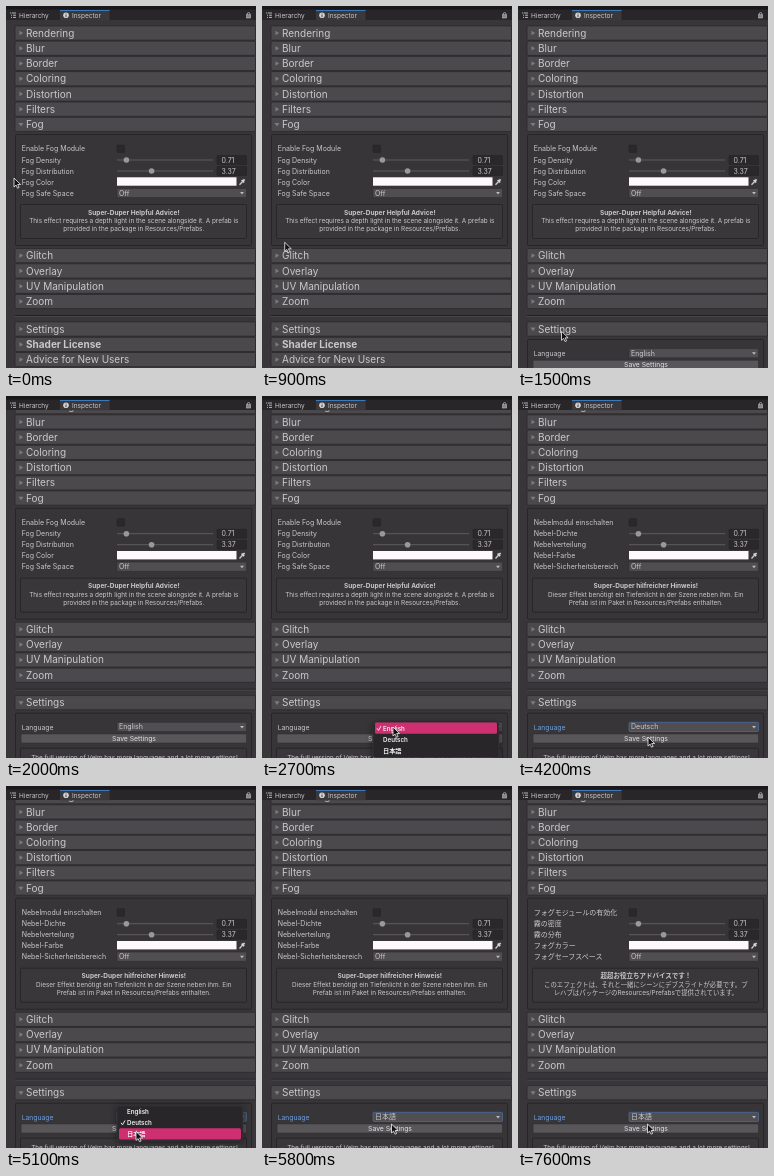
An HTML page that plays this animation: 250 px wide and 362 px high, repeating every 7.7 s.

```html
<!DOCTYPE html>
<html lang="en">
<head>
<meta charset="utf-8">
<title>Inspector language switch</title>
<style>
html, body { margin: 0; width: 100%; height: 100%; overflow: hidden; background: #383639; }
svg { display: block; width: 100vw; height: 100vh; }
text { font-family: Inter, "Noto Sans CJK JP", "Noto Sans CJK", sans-serif; fill: #cac8cb; white-space: pre; }
#menu { filter: drop-shadow(0 1px 3px rgba(0, 0, 0, .55)); }
#menu text { fill: #f2f0f2; font-weight: 600; }
</style>
</head>
<body>
<svg id="stage" viewBox="0 0 250 362"></svg>
<script>
const LOOP = 7700;
const SCROLL = -16.3;
const LANGS = ['English', 'Deutsch', '日本語'];
const FOG = [
  {
    labels: ['Enable Fog Module', 'Fog Density', 'Fog Distribution', 'Fog Color', 'Fog Safe Space'],
    tip: ['Super-Duper Helpful Advice!',
      'This effect requires a depth light in the scene alongside it. A prefab is',
      'provided in the package in Resources/Prefabs.']
  },
  {
    labels: ['Nebelmodul einschalten', 'Nebel-Dichte', 'Nebelverteilung', 'Nebel-Farbe', 'Nebel-Sicherheitsbereich'],
    tip: ['Super-Duper hilfreicher Hinweis!',
      'Dieser Effekt benötigt ein Tiefenlicht in der Szene neben ihm. Ein',
      'Prefab ist im Paket in Resources/Prefabs enthalten.']
  },
  {
    labels: ['フォグモジュールの有効化', '霧の密度', '霧の分布', 'フォグカラー', 'フォグセーフスペース'],
    tip: ['超超お役立ちアドバイスです！',
      'このエフェクトは、それと一緒にシーンにデプスライトが必要です。プ',
      'レハブはパッケージのResources/Prefabsで提供されています。']
  }
];

// Pointer stops: time, x, y. It is out of sight between 2000 and 2200.
const PATH = [
  [0, 8, 172], [700, 8, 172], [1150, 43, 325], [1400, 43, 325], [1500, 43.5, 325.3],
  [2000, 43.5, 325.3], [2200, 160, 354], [2500, 131, 331], [2800, 131, 331],
  [3200, 131.5, 345], [3600, 131.5, 345], [3900, 130, 341], [4400, 130, 341],
  [4600, 130, 332], [4800, 130, 336], [5150, 130, 346], [5300, 130, 346],
  [5700, 129.5, 338], [LOOP, 129.5, 338]
];

const rect = (x, y, w, h, fill, extra = '') =>
  `<rect x="${x}" y="${y}" width="${w}" height="${h}" fill="${fill}" ${extra}/>`;
const text = (x, mid, str, size = 7, extra = '') =>
  `<text x="${x}" y="${mid + size * 0.36}" font-size="${size}" ${extra}>${str}</text>`;
const frame = (x, y, w, h, fill) => rect(x + .5, y + .5, w - 1, h - 1, fill, 'stroke="#272528" rx="1"');
const chevron = (x, y) => `<path d="M${x - 2} ${y - 1}h4l-2 2.6z" fill="#bdbbbe"/>`;

function header(name, mid, open, bold) {
  const mark = open ? `M12.5 ${mid - 1.4}h5l-2.5 3.6z` : `M13.5 ${mid - 2.3}l3.6 2.3l-3.6 2.3z`;
  return rect(9, mid - 7.1, 240.5, 14.2, '#4b494c', 'stroke="#2b292c" stroke-width=".8" rx="1"') +
    `<path d="${mark}" fill="#7d7b7e"/>` +
    text(20, mid, name, 10, bold ? 'font-weight="700"' : '');
}

const slider = (mid, knob, value) =>
  rect(111, mid - .5, 96, 1, '#5e5c5f') +
  `<circle cx="${knob}" cy="${mid}" r="2.8" fill="#999"/>` +
  rect(211, mid - 4.5, 29.5, 9, '#2a282b', 'rx="1" stroke="#212121" stroke-width=".5"') +
  text(215.5, mid, value);

const dropdown = (mid, str, id) =>
  rect(111, mid - 4.6, 129.5, 9.2, '#504e51', `rx="1" stroke="#302e31" stroke-width=".6" id="${id}Box"`) +
  text(113, mid, str, 7, `id="${id}Text"`) + chevron(236, mid);

function fogPanel() {
  const rows = [142.7, 154, 165, 176, 187];
  return frame(9, 128, 237, 112, '#373538') +
    rows.map((y, i) => text(15.7, y, '', 7, `id="label${i}"`)).join('') +
    rect(111, 139, 7.5, 7.5, '#2a282b', 'rx="1" stroke="#202020" stroke-width=".5"') +
    slider(154, 120.4, '0.71') + slider(165, 145.6, '3.37') +
    rect(111, 171.3, 119.5, 8.4, '#fdf9fc') +
    '<path d="M233.5 178.8l3.2-3.4" stroke="#c8c8c8" stroke-width="1.4"/>' +
    '<path d="M235.6 174l2.6 2.5M237 175l1.6-1.7" stroke="#d4d4d4" stroke-width="1.7"/>' +
    dropdown(187, 'Off', 'safe') +
    frame(14, 198, 227, 35, '#39373a') +
    [206.4, 214.6, 222.7].map((y, i) =>
      text(127.8, y, '', i ? 6.4 : 6.5, `id="tip${i}" text-anchor="middle" ${i ? '' : 'font-weight="700"'}`)).join('');
}

const settingsPanel = () =>
  frame(9, 333, 237, 80, '#373538') +
  text(15.7, 347.5, 'Language', 6.8, 'id="langLabel"') + dropdown(347.2, 'English', 'lang') +
  rect(15, 354.2, 225.5, 9.2, '#585659', 'rx="1" stroke="#302e31" stroke-width=".6" id="save"') +
  text(128, 358.6, 'Save Settings', 6.8, 'text-anchor="middle" style="fill:#e4e2e5"') +
  frame(14, 368, 227, 40, '#39373a') +
  text(128.5, 378, 'The full version of Velm has more languages and a lot more settings!', 6.4, 'text-anchor="middle"');

function tabs() {
  return rect(0, 0, 250, 14, '#282629') + rect(0, 0, 250, 3.5, '#19171a') +
    rect(54, 4, 49.5, 10.3, '#3a383b') + rect(54, 4, 49.5, 1, '#3a79bb') +
    '<path d="M4 7h1.3M6 7h4M5 9.2h1M7 9.2h3M5 11.4h1M7 11.4h3" stroke="#c4c4c4" stroke-width=".9"/>' +
    text(13, 9.4, 'Hierarchy', 6.5) +
    '<circle cx="60" cy="9.3" r="2.8" fill="#d4d4d4"/><path d="M60 7.5v.9M60 8.9v2.2" stroke="#333" stroke-width=".9"/>' +
    text(66, 9.4, 'Inspector', 6.5) +
    '<path d="M241.2 9v-1a1.4 1.4 0 0 1 2.8 0v1" fill="none" stroke="#bbb" stroke-width=".8"/>' +
    rect(240.6, 8.8, 4, 3.2, '#858386', 'stroke="#bbb" stroke-width=".6"');
}

const popup = () =>
  rect(111, 0, 126, 35, '#282629', 'rx="2" stroke="#454346" stroke-width=".5"') +
  rect(113, 0, 122, 11.2, '#cd2f70', 'rx="1.5" id="hot"') +
  LANGS.map((name, i) => text(121, 5.8 + i * 11.2, name, 6.2)).join('') +
  '<path id="tick" d="M115 5.8l1.5 2l2.5-4.3" fill="none" stroke="#eee" stroke-width="1"/>';

const names = ['Rendering', 'Blur', 'Border', 'Coloring', 'Distortion', 'Filters', 'Fog'];
const lower = ['Glitch', 'Overlay', 'UV Manipulation', 'Zoom'];
const stage = document.getElementById('stage');
stage.innerHTML =
  rect(0, 0, 250, 362, '#383639') +
  '<g id="page">' +
  names.map((n, i) => header(n, 27 + i * 15.23, n === 'Fog')).join('') + fogPanel() +
  lower.map((n, i) => header(n, 249.6 + i * 15.3)).join('') +
  rect(9, 309, 240.5, 1, '#222023') + rect(9, 310, 240.5, .7, '#504e51') +
  `<g id="closed">${header('Settings', 323)}${header('Shader License', 338.4, false, true)}${header('Advice for New Users', 353.6)}</g>` +
  `<g id="open">${header('Settings', 323, true)}${settingsPanel()}</g>` +
  '</g>' + tabs() + `<g id="menu">${popup()}</g>` +
  '<path id="pointer" d="M0 0v9l2.1-1.9l1.4 3.1l1.6-.7l-1.4-3h2.9z" fill="#111" stroke="#f2f2f2" stroke-width=".8"/>';

const el = {};
stage.querySelectorAll('[id]').forEach(n => el[n.id] = n);
const show = (node, on) => node.setAttribute('display', on ? 'inline' : 'none');
const move = (node, x, y) => node.setAttribute('transform', `translate(${x} ${y})`);
const within = (t, a, b) => t >= a && t < b;

function pointerAt(t) {
  const i = Math.max(1, PATH.findIndex(p => p[0] > t));
  const [t0, x0, y0] = PATH[i - 1], [t1, x1, y1] = PATH[i];
  const k = (t - t0) / (t1 - t0), s = k * k * (3 - 2 * k);
  return [x0 + (x1 - x0) * s, y0 + (y1 - y0) * s];
}

function draw(t) {
  const saved = t < 4100 ? 0 : t < 6200 ? 1 : 2;
  const chosen = t < 3600 ? 0 : t < 5300 ? 1 : 2;
  const [px, py] = pointerAt(t);

  move(el.page, 0, t < 2000 ? 0 : SCROLL);
  show(el.closed, t < 1200);
  show(el.open, t >= 1200);

  FOG[saved].labels.forEach((s, i) => el['label' + i].textContent = s);
  FOG[saved].tip.forEach((s, i) => el['tip' + i].textContent = s);

  const focus = t >= 3600;
  el.langText.textContent = LANGS[chosen];
  el.langLabel.style.fill = focus ? '#6c9fe0' : '#cac8cb';
  el.langBox.setAttribute('stroke', focus ? '#4479b5' : '#302e31');
  el.save.setAttribute('fill', within(t, 4000, 4100) || within(t, 6100, 6200) ? '#46607c' : '#585659');

  const first = within(t, 2700, 3600), second = within(t, 4700, 5300);
  const top = first ? 326.6 : 319.8;
  const row = Math.max(0, Math.min(2, Math.floor((py - top) / 11.2)));
  show(el.menu, first || second);
  move(el.menu, 0, top);
  move(el.hot, 0, row * 11.2);
  move(el.tick, 0, chosen * 11.2);

  show(el.pointer, !within(t, 2000, 2200));
  move(el.pointer, px, py);
}

function tick() {
  draw(performance.now() % LOOP);
  requestAnimationFrame(tick);
}
tick();
</script>
</body>
</html>
```
